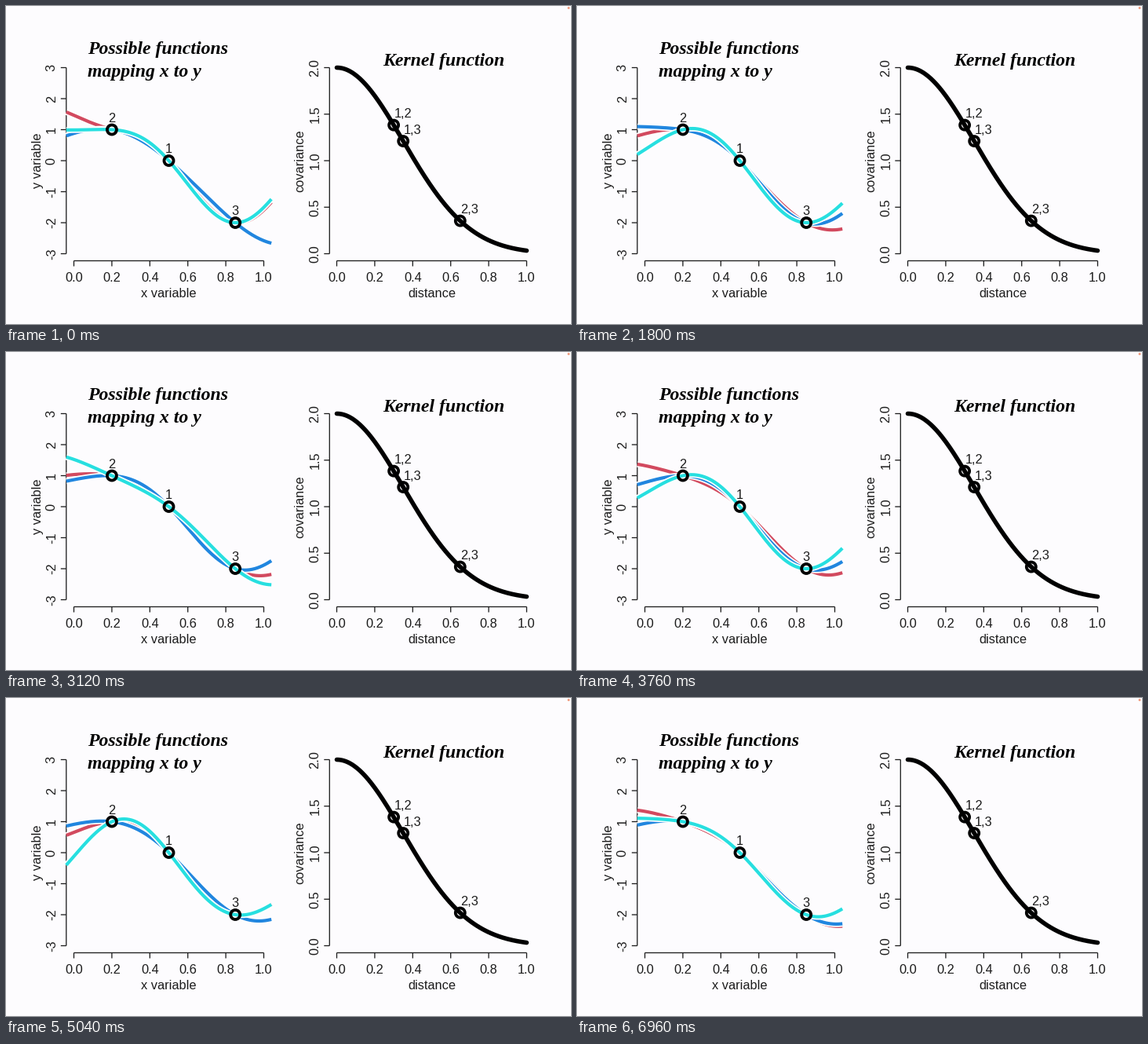
Write a matplotlib script that moves like this. It is 720 by 405 pixels and loops after 7 s.

```python
import numpy as np
import matplotlib.pyplot as plt
from matplotlib.animation import FuncAnimation
from matplotlib.patches import Circle

plt.rcParams["font.family"] = "Liberation Sans"

W, H, DPI = 720, 405, 72          # at 72 dpi one point is one pixel
FRAMES, STEP = 175, 40
INK = "#1c1c1c"
RED, BLUE, CYAN = "#d24a5f", "#2186df", "#27dfe0"

fig = plt.figure(figsize=(W / DPI, H / DPI), dpi=DPI, facecolor="#fdfcfe")
ax = fig.add_axes([0, 0, 1, 1])
ax.set_xlim(0, W)
ax.set_ylim(H, 0)
ax.axis("off")


def scale(v0, p0, v1, p1):
    return lambda v: p0 + (np.asarray(v) - v0) * (p1 - p0) / (v1 - v0)


def segment(x, y):
    ax.plot(x, y, color=INK, lw=1.3, solid_capstyle="butt", snap=False)


def label(x, y, s, **kw):
    opts = dict(size=16.4, color=INK, ha="center", va="center_baseline")
    ax.text(x, y, s, **{**opts, **kw})


def upright(x, y, s):
    label(x + 1.5, y, s, rotation=90, va="center")


def title(x, y, s):
    ax.text(x, y, s, family="Liberation Serif", weight="bold", style="italic",
            size=23.7, color="black", va="baseline")


def x_axis(sx, name):
    segment(sx([0, 1]), [324.5, 324.5])
    for t in np.linspace(0, 1, 6):
        segment([sx(t)] * 2, [324.5, 331.5])
        label(sx(t), 345, f"{t:.1f}")
    label(sx(0.5), 365.3, name)


def y_axis(sy, x, ticks, fmt, name, name_x):
    segment([x, x], sy([ticks[0], ticks[-1]]))
    for t in ticks:
        segment([x - 7, x], [sy(t)] * 2)
        upright(x - 20, sy(t), format(t, fmt))
    upright(name_x, 197, name)


def ring(x, y):
    ax.add_patch(Circle((x, y), 6, fill=False, ec="black", lw=3.8, zorder=5))


def kernel(d):
    return 2 * np.exp(-4.1 * np.square(d))


# Left panel
lx, ly = scale(0, 86.5, 1, 328.5), scale(0, 197, 3, 78.5)
x_axis(lx, "x variable")
y_axis(ly, 76.8, range(-3, 4), "d", "y variable", 39.5)
title(104, 61.5, "Possible functions")
title(104, 90.3, "mapping x to y")

POINTS = [(0.5, 0), (0.2, 1), (0.85, -2)]
for i, (px, py) in enumerate(POINTS, 1):
    ring(lx(px), ly(py))
    label(lx(px), ly(py) - 16, str(i), zorder=6)

# Right panel
rx, ry = scale(0, 421.5, 1, 663.5), scale(0, 315.5, 2, 78.5)
x_axis(rx, "distance")
y_axis(ry, 412.3, np.linspace(0, 2, 5), ".1f", "covariance", 373)
title(480.5, 76, "Kernel function")
d = np.linspace(0, 1, 200)
ax.plot(rx(d), ry(kernel(d)), color="black", lw=5.6, solid_capstyle="round")
for i, j in [(1, 2), (1, 3), (2, 3)]:
    gap = abs(POINTS[i - 1][0] - POINTS[j - 1][0])
    cx, cy = rx(gap), ry(kernel(gap))
    ring(cx, cy)
    label(cx + 12, cy - 15.5, f"{i},{j}", zorder=6)

ax.add_patch(Circle((717, 2.5), 1.5, color="#f09a7c", lw=0))

# Left and right end heights of the red, blue and cyan curves at a few moments
POSES = {
    0: [(1.57, -1.34), (0.80, -2.66), (0.99, -1.24)],
    1800: [(0.80, -2.20), (1.10, -1.70), (0.20, -1.37)],
    2480: [(0.63, -2.18), (0.98, -1.75), (1.20, -2.55)],
    3760: [(1.37, -2.13), (0.71, -1.77), (0.28, -1.34)],
    5040: [(0.56, -1.67), (0.86, -2.15), (-0.40, -1.67)],
    5840: [(-0.40, -1.09), (0.23, -1.87), (0.51, -1.55)],
    6960: [(1.37, -2.37), (0.89, -2.29), (1.11, -1.81)],
}
times, ends = np.array(list(POSES)), np.array(list(POSES.values()))
slopes = np.gradient(ends, times, axis=0)


def ends_at(t):
    """Hermite blend of the poses; the curves take turns to swing wide."""
    k = min(np.searchsorted(times, t, side="right") - 1, len(times) - 2)
    h = times[k + 1] - times[k]
    u = (t - times[k]) / h
    v = 1 - u
    e = (v * v * ((1 + 2 * u) * ends[k] + u * h * slopes[k])
         + u * u * ((1 + 2 * v) * ends[k + 1] - v * h * slopes[k + 1]))
    swing = np.sqrt(h / 1800) * np.sin(np.pi * u ** 0.6) ** 2
    e[k % 3] += swing * np.array([1, -0.6])
    return e


# Gaussian process mean through the points and both ends
xs = np.linspace(-0.04, 1.04, 160)
knots = np.array([p[0] for p in POINTS] + [xs[0], xs[-1]])
fixed = [p[1] for p in POINTS]
weights = kernel(xs[:, None] - knots) @ np.linalg.inv(
    kernel(knots[:, None] - knots))


def curve(color, z):
    """A coloured line above its white halo."""
    return [ax.plot(lx(xs), ly(0 * xs), color=c, lw=lw, zorder=z,
                    solid_capstyle="butt")[0]
            for c, lw in (("white", 7.6), (color, 4.2))]


curves = [curve(c, 3 + n / 10) for n, c in enumerate((RED, BLUE, CYAN))]


def draw(i):
    for pair, e in zip(curves, ends_at(i * STEP)):
        y = ly(weights @ np.array([*fixed, *e]))
        for line in pair:
            line.set_ydata(y)
    return sum(curves, [])


anim = FuncAnimation(fig, draw, frames=FRAMES, interval=STEP,
                     repeat=True, repeat_delay=0, blit=False)
plt.show()
```
